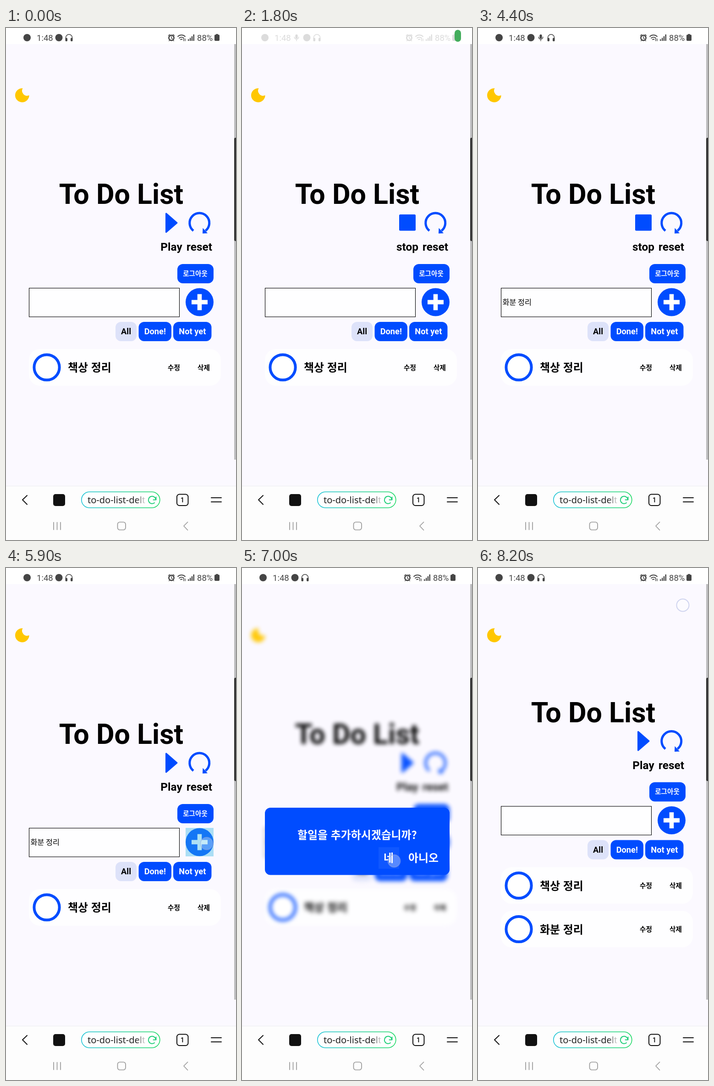
Recreate the animation shown at these times as an HTML page. Size 502 by 1115 pixels, loop 8300 ms.

```html
<!DOCTYPE html>
<html lang="ko">
<head>
<meta charset="utf-8">
<title>To Do List</title>
<style>
html, body { margin: 0; width: 100%; height: 100%; overflow: hidden; background: #fff; }
svg { display: block; width: 100vw; height: 100vh; }
text { font-family: Roboto, 'Noto Sans CJK KR', 'Noto Sans CJK', sans-serif; font-weight: 700; }
.ko { font-family: 'Noto Sans CJK KR', 'Noto Sans CJK', sans-serif; }
.mid { text-anchor: middle; }
.line { fill: none; stroke-linecap: round; stroke-linejoin: round; }
.blue { fill: #004cff; }
.white { fill: #fff; }
.s24 { font-size: 24.36px; }
.k24 { font-size: 23.9px; }
.s18 { font-size: 18.27px; }
.s15 { font-size: 14.6px; }
.bar { font-size: 18.5px; font-weight: 400; }

/* One shared 8.3 s clock; poses change every 100 ms */
.a { animation: 8.3s step-end infinite; }
#play { animation-name: play; }
#stop { animation-name: stop; }
#word1 { animation-name: word1; }
#word2 { animation-name: word2; }
#app { animation-name: lift; }
#item2 { animation-name: added; }
#page { animation-name: blur; }
#modal { animation-name: modal; }
#touch { animation-name: touch; }
#tapPlay { animation-name: tapPlay; }
#tapAdd { animation-name: tapAdd; }
#tapYes { animation-name: tapYes; }
#status { animation-name: status; }
#talk { animation-name: talk; }
#mic { animation-name: mic; }
#phones { animation-name: phones; }
#pill { animation-name: pill; }
#pillMic { animation-name: pillMic; }

@keyframes play { 0% { opacity: 1 } 7.22% { opacity: 0 } 61.44%, 100% { opacity: 1 } }
@keyframes stop { 0% { opacity: 0 } 7.22% { opacity: 1 } 61.44%, 100% { opacity: 0 } }
@keyframes word1 { 0% { opacity: 0 } 46.98% { opacity: 1 } 85.54%, 100% { opacity: 0 } }
@keyframes word2 { 0% { opacity: 0 } 53.01% { opacity: 1 } 85.54%, 100% { opacity: 0 } }
@keyframes lift { 0% { transform: none } 85.54%, 100% { transform: translateY(-47.5px) } }
@keyframes added { 0% { opacity: 0 } 85.54%, 100% { opacity: 1 } }
@keyframes blur {
  0% { filter: none; opacity: 1 }
  72.28% { filter: blur(2.2px); opacity: .95 }
  73.49% { filter: blur(4px); opacity: .92 }
  74.69% { filter: blur(4.9px); opacity: .96 }
  85.54%, 100% { filter: none; opacity: 1 }
}
@keyframes modal {
  0% { opacity: 0; transform: translateY(-50px) }
  72.28% { opacity: .6; transform: translateY(-20px) }
  73.49% { opacity: .95; transform: translateY(-3px) }
  74.69% { opacity: 1; transform: none }
  85.54%, 100% { opacity: 0; transform: none }
}
@keyframes touch {
  0% { opacity: 0; transform: translate(362px, 428px) }
  4.81% { opacity: 1; transform: translate(362px, 428px) }
  8.43% { opacity: 0; transform: translate(438px, 600px) }
  69.87% { opacity: 1; transform: translate(438px, 600px) }
  72.28% { opacity: 0; transform: translate(332px, 638px) }
  81.92% { opacity: 1; transform: translate(332px, 638px) }
  85.54% { opacity: 0; transform: translate(447px, 81px) }
  97.59%, 100% { opacity: 1; transform: translate(447px, 81px) }
}
@keyframes tapPlay { 0% { opacity: 0 } 6.02% { opacity: 1 } 7.22%, 100% { opacity: 0 } }
@keyframes tapAdd { 0% { opacity: 0 } 69.87% { opacity: 1 } 72.28%, 100% { opacity: 0 } }
@keyframes tapYes { 0% { opacity: 0 } 83.13% { opacity: 1 } 85.54%, 100% { opacity: 0 } }
@keyframes status {
  0% { opacity: 1; transform: none }
  8.43% { opacity: 1; transform: none; animation-timing-function: steps(3, end) }
  12.04% { opacity: 0; transform: translateX(4px) }
  21.68% { opacity: .19; transform: translateX(4px); animation-timing-function: steps(5, end) }
  27.7%, 100% { opacity: 1; transform: none }
}
@keyframes talk { 0% { transform: none } 12.04% { transform: translateX(22px) } 26.5%, 100% { transform: none } }
@keyframes mic {
  0% { opacity: 0; transform: none }
  12.04% { opacity: 1; transform: none }
  26.5% { opacity: 1; transform: translateX(22px) }
  62.65%, 100% { opacity: 0; transform: none }
}
@keyframes phones { 0% { transform: none } 12.04% { transform: translateX(22px) } 62.65%, 100% { transform: none } }
@keyframes pill {
  0% { x: 478px; width: 0; rx: 0 }
  9.63% { x: 464px; width: 14px; rx: 7px; animation-timing-function: steps(3, end) }
  13.25% { x: 430px; width: 48px; rx: 13px }
  21.68% { x: 464px; width: 14px; rx: 7px }
  22.89% { x: 470px; width: 8px; rx: 4px }
  24.09%, 100% { x: 478px; width: 0; rx: 0 }
}
@keyframes pillMic { 0% { opacity: 0 } 13.25% { opacity: 1 } 21.68%, 100% { opacity: 0 } }
</style>
</head>
<body>
<svg viewBox="0 0 502 1115">
  <defs>
    <linearGradient id="edge"><stop stop-color="#1cc3d6"/><stop offset="1" stop-color="#1bd862"/></linearGradient>
    <linearGradient id="fade"><stop stop-color="#fff" stop-opacity="0"/><stop offset="1" stop-color="#fff"/></linearGradient>
    <g id="micShape">
      <rect x="-2.6" y="-7" width="5.2" height="9" rx="2.6"/>
      <path class="line" d="M-4.8-1.5a4.8 5 0 0 0 9.6 0M0 4v3" stroke="currentColor" stroke-width="1.4"/>
    </g>
    <g id="card">
      <rect x="50" y="699" width="419" height="80" rx="24" fill="#fefeff"/>
      <circle cx="89" cy="739" r="27.6" fill="#fff" stroke="#004cff" stroke-width="6"/>
      <text class="ko s15" x="353" y="744.5">수정</text>
      <text class="ko s15" x="418" y="744.5">삭제</text>
    </g>
  </defs>

  <rect width="502" height="1115" fill="#fff"/>
  <rect y="35" width="502" height="963" fill="#fbf9ff"/>

  <g id="page" class="a">
    <path d="M36.5 131.2A15.3 15.3 0 1 0 50.6 146.6A11 11 0 0 1 36.5 131.2Z" fill="#ffc700"/>
    <g id="app" class="a">
      <text class="mid" x="251.5" y="383" font-size="60.9">To Do List</text>

      <g id="play" class="a">
        <path class="blue" d="M349.5 404L373 424.3L349.5 444.5Z" stroke="#004cff" stroke-width="3" stroke-linejoin="round"/>
        <text class="mid s24" x="361" y="485">Play</text>
      </g>
      <g id="stop" class="a">
        <rect class="blue" x="343" y="406" width="36" height="35.5" rx="2.5"/>
        <text class="mid s24" x="361" y="485">stop</text>
      </g>
      <path d="M409 441.5A21.5 21.5 0 1 1 435.5 441.5" fill="none" stroke="#004cff" stroke-width="5"/>
      <path class="blue" d="M429.5 435.5L440 447L429 447.5Z"/>
      <text class="mid s24" x="422" y="485">reset</text>

      <rect class="blue" x="374" y="514" width="79" height="42" rx="12"/>
      <text class="mid ko s15 white" x="413" y="539.5">로그아웃</text>

      <rect x="50.5" y="566.5" width="328" height="62.5" fill="#fefeff" stroke="#000" stroke-width="1.1"/>
      <text class="ko" x="53.5" y="603" font-size="16.24" style="font-weight:400"><tspan id="w">
        </tspan></text>
      <g font-size="16.24">
        <text id="word1" class="ko a" x="53.5" y="603" style="font-weight:400">화분</text>
        <text id="word2" class="ko a" x="87" y="603" style="font-weight:400">정리</text>
      </g>
      <circle class="blue" cx="422.5" cy="597" r="30.5"/>
      <path d="M405 597H440M422.5 579.5V614.5" stroke="#fff" stroke-width="9.5"/>

      <rect x="239" y="640" width="46" height="42" rx="12" fill="#dde2f9"/>
      <rect class="blue" x="289.5" y="640" width="71.5" height="42" rx="12"/>
      <rect class="blue" x="365" y="640" width="83.5" height="42" rx="12"/>
      <text class="mid s18" x="262" y="667">All</text>
      <text class="mid s18 white" x="325.3" y="667">Done!</text>
      <text class="mid s18 white" x="406.8" y="667">Not yet</text>

      <use href="#card"/>
      <text class="ko k24" x="135" y="748">책상 정리</text>
      <g id="item2" class="a">
        <use href="#card" y="95"/>
        <text class="ko k24" x="135" y="843">화분 정리</text>
      </g>
    </g>
  </g>

  <g fill="#33b5e5" fill-opacity=".4">
    <rect id="tapPlay" class="a" x="337" y="399" width="48" height="50"/>
    <rect id="tapAdd" class="a" x="392" y="566" width="61" height="62"/>
  </g>

  <g id="modal" class="a">
    <rect class="blue" x="50" y="522" width="403" height="146.5" rx="12"/>
    <rect id="tapYes" class="a" x="298" y="608" width="45" height="47" fill="#fff" fill-opacity=".06"/>
    <g class="white">
      <text class="mid ko k24" x="251.5" y="589.5">할일을 추가하시겠습니까?</text>
      <text class="mid ko k24" x="320" y="640">네</text>
      <text class="mid ko k24" x="396" y="640">아니오</text>
    </g>
  </g>

  <rect x="498" y="35" width="4" height="905" fill="#bdbdbf"/>
  <rect x="498" y="239" width="8" height="225" rx="3" fill="#333"/>

  <circle id="touch" class="a" r="13.5" fill="#fff" fill-opacity=".3" stroke="#9aa6dc" stroke-opacity=".45" stroke-width="2"/>

  <!-- status bar -->
  <g id="status" class="a" fill="#454545" color="#454545">
    <circle cx="46" cy="21" r="8"/>
    <text class="bar" x="67" y="27.5">1:48</text>
    <circle id="talk" class="a" cx="115.5" cy="21" r="8"/>
    <g id="mic" class="a"><use href="#micShape" x="115" y="21"/></g>
    <g id="phones" class="a">
      <path class="line" d="M130.5 23v-2a7 7 0 0 1 14 0v2" stroke="#454545" stroke-width="1.6"/>
      <rect x="129.5" y="21.5" width="4.5" height="7.5" rx="1.8"/>
      <rect x="141" y="21.5" width="4.5" height="7.5" rx="1.8"/>
    </g>
    <g class="line" stroke="#454545" stroke-width="1.8">
      <circle cx="361" cy="21.5" r="5.6" stroke-width="2.6"/>
      <path d="M361 18.5V22L363.3 23.3M354.5 16.5L357.5 14M367.5 16.5L364.5 14M356.8 27L355.8 28M365.2 27L366.2 28" stroke-width="1.5"/>
      <path d="M375 18.5a11.5 11.5 0 0 1 16 0M378 22a7.5 7.5 0 0 1 10 0M381 25.2a3.5 3.5 0 0 1 3.5-.4"/>
      <path d="M387.8 28v-4.5M391 23.5V28" stroke-width="1.4"/>
    </g>
    <path d="M397 24.5h2.4V28H397zM401 21.5h2.4V28H401zM404.8 18h2.4V28h-2.4zM408.6 14h2.4V28h-2.4z"/>
    <text class="bar" x="417" y="27.5">88%</text>
    <path d="M458.5 13h4v1.5h1.5a2 2 0 0 1 2 2V26a2 2 0 0 1-2 2h-7a2 2 0 0 1-2-2v-9.500a2 2 0 0 1 2-2h1.500z"/>
  </g>
  <rect id="pill" class="a" y="4" height="26" fill="#43ad5c"/>
  <g id="pillMic" class="a" fill="#fff" color="#fff"><use href="#micShape" x="454" y="17"/></g>

  <!-- browser bar -->
  <rect y="998" width="502" height="117" fill="#fdfdfd"/>
  <path d="M0 997.5H502" stroke="#ededf0"/>
  <g class="line" stroke="#111" stroke-width="2">
    <path d="M46 1018L36 1027.500L46 1037.500M448 1023H470M448 1032H470"/>
    <rect x="373" y="1015.500" width="24.500" height="24.500" rx="5.500"/>
  </g>
  <rect x="103" y="1015" width="26" height="26" rx="5" fill="#111"/>
  <text class="mid" x="385" y="1032.500" font-size="14" style="font-weight:500">1</text>
  <rect x="164.800" y="1010.300" width="171" height="34.500" rx="17.250" fill="#fff" stroke="url(#edge)" stroke-width="1.600"/>
  <text x="178" y="1034.500" font-size="20" fill="#222" style="font-family:'Noto Sans',sans-serif;font-weight:400">to-do-list-delt</text>
  <rect x="284" y="1014" width="23" height="27" fill="url(#fade)"/>
  <g class="line" stroke="#1fcf78" stroke-width="2">
    <path d="M324 1034a8 8 0 1 1 2.800-7.500M327.500 1021.500V1027.500H321.500"/>
  </g>

  <!-- system navigation -->
  <g class="line" stroke="#999" stroke-width="1.700">
    <path d="M104 1076.500V1092.500M111.500 1076.500V1092.500M119 1076.500V1092.500M396.500 1076L388 1084.500L396.500 1093.500"/>
    <rect x="243.500" y="1076" width="17.500" height="17" rx="5"/>
  </g>
</svg>
</body>
</html>
```
